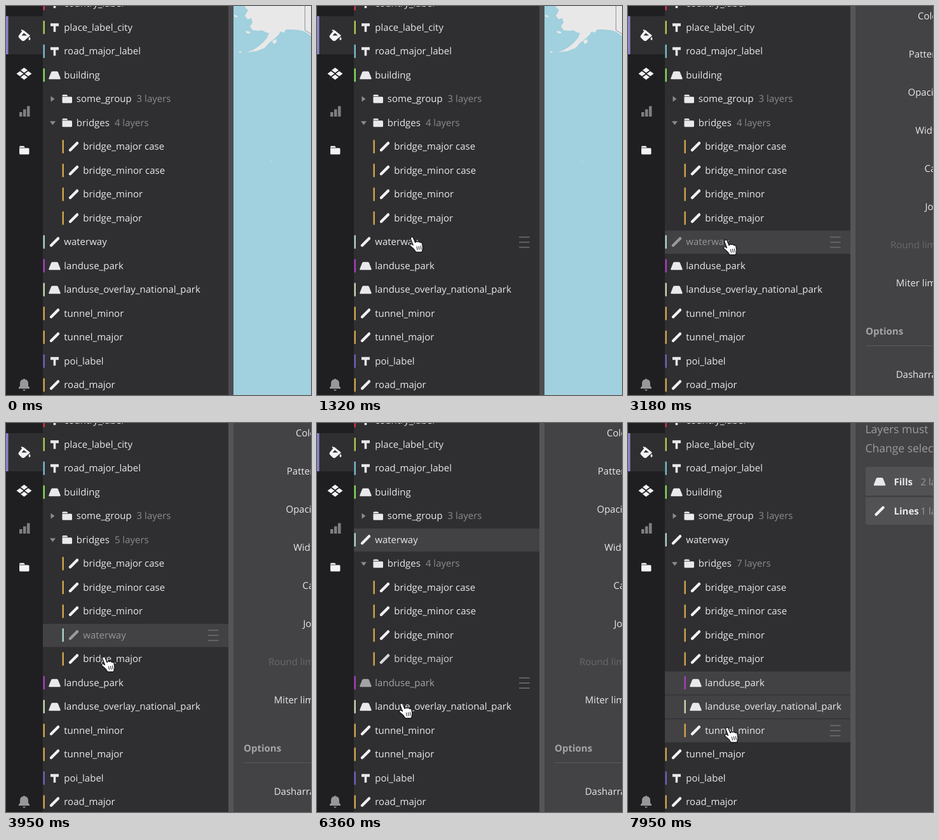
These frames come from a looping animation (480 by 612 pixels, 8000 ms). An HTML page:

```html
<!DOCTYPE html>
<html lang="en">
<head>
<meta charset="utf-8">
<title>Layer list</title>
<style>
  html, body { margin: 0; width: 100%; height: 100%; overflow: hidden; background: #2f2e31; }
  svg { display: block; width: 480px; height: 612px; font: 15px "Open Sans", sans-serif; fill: #e9e8ea; color: #f1f0f2; text-rendering: geometricPrecision; }
  .soft { fill: #8b8a8d; }
  .mid { fill: #9c9b9e; }
  .bold { font-weight: 700; }
</style>
</head>
<body>
<svg viewBox="0 0 480 612">
  <g id="map">
    <rect x="350" width="130" height="612" fill="#a1d0de"/>
    <path fill="#e9e8e9" d="M375 0L381 7L376 15L380 21L386 19L388 26L384 32L388 38L398 39L403 38L410 42L414 42L411 50L405 57L397 64L389 69L379 73L394 71L407 66L414 58L423 51L429 45L432 40L437 42L441 37L452 37L462 38L470 40L480 47V0Z"/>
    <path fill="#e9e8e9" d="M359 14l4 1 2 3-5-1ZM377 39l6 1 2 3-6 0ZM419 55l6-3 1 5-5 3ZM366 72l6-1-4 3ZM416 244h2v1h-2Z"/>
    <path d="M470.500 0V38L480 44" fill="none" stroke="#8d9297"/>
  </g>
  <g id="style">
    <rect x="350" width="130" height="612" fill="#434245"/>
    <g id="props" text-anchor="end"></g>
    <text class="bold" x="374" y="517" fill="#a5a4a7">Options</text>
    <path d="M374 534.500H480" stroke="#59585b"/>
  </g>
  <g id="multi">
    <rect x="350" width="130" height="612" fill="#434245"/>
    <g class="mid" font-size="17.500"><text x="373.500" y="16">Layers must</text><text x="373.500" y="46">Change selected</text></g>
    <path d="M480 69H377q-3 0-3 3V114H480ZM480 117H374V157q0 3 3 3H480Z" fill="#525154"/>
    <g id="cards"></g>
  </g>
  <rect id="divider" x="350" width="8" height="612"/>
  <rect x="58" width="292" height="612" fill="#2f2e31"/>
  <g id="list"></g>
  <rect width="58" height="612" fill="#1f1e21"/>
  <rect y="16" width="58" height="60" fill="#2f2e31"/>
  <rect y="16" width="3.500" height="60" fill="#8b86c9"/>
  <g id="rail" fill="#f3f2f4">
    <path d="M27 37.500l11 9-9 8q-2 1-4 0l-5-5q-1-2 0-3Z"/>
    <path d="M24 37.500l10 8" fill="none" stroke="#f3f2f4" stroke-width="1.800"/>
    <path d="M24.500 46.500L28 42.500L33 46.500Z" fill="#2f2e31"/>
    <path d="M37 48.500q3 4 0 5.500q-3-1.500 0-5.500Z"/>
    <path d="M28.500 97l5.500 4-5.500 4-5.500-4ZM22 102.500l5.500 4-5.500 4-5.500-4ZM35 102.500l5.500 4-5.500 4-5.500-4ZM28.500 108l5.500 4-5.500 4-5.500-4Z"/>
    <path fill="#7f7e81" d="M21 167h4.500v7h-4.500ZM27 162.500h4.500v11.500h-4.500ZM33 157.500h4.500v16.500h-4.500Z"/>
    <path fill="#98979a" d="M20 602V600L22 598V594Q22 588 27 587.500Q28.500 585 30 587.500Q35 588 35 594V598L37 600V602ZM26 603.500h5q-2.500 4-5 0Z"/>
  </g>
  <g id="hand" stroke="#161518" stroke-linejoin="round" stroke-linecap="round">
    <path fill="#fff" stroke-width="1.300" d="M-4.500 1Q-3.500-2-.5-1L3 7.500Q5 5 7 6.500Q9 5 10.500 7.500Q13.500 6.500 14 9.500L15 16L13.500 22.500H4L1 18L-5.500 12.500Q-5.500 9-2.500 10L-.5 11.500Z"/>
    <path fill="none" d="M5.500 14l1 5M8.500 13.500l1 5M11.500 13l.8 5"/>
  </g>
</svg>
<script>
const $ = id => document.getElementById(id);
const LOOP = 8000, ROW = 37.5, GOLD = '#cda348';
const SHOW_STYLE = 1900, PICK_PARK = 6920, PICK_RANGE = 7340, GROUP_RANGE = 7800;

const layer = (name, icon, color, nested = false) => ({ name, icon, color, nested });
const folder = (name, open) => ({ name, folder: true, open });
const WATERWAY = layer('waterway', 'line', '#adcfcb');
const BASE = [
  layer('country_label', 'text', '#d3324a'),
  layer('place_label_city', 'text', '#abc950'),
  layer('road_major_label', 'text', '#76bcc8'),
  layer('building', 'fill', '#81dc58'),
  folder('some_group', false),
  folder('bridges', true),
  layer('bridge_major case', 'line', GOLD, true),
  layer('bridge_minor case', 'line', GOLD, true),
  layer('bridge_minor', 'line', GOLD, true),
  layer('bridge_major', 'line', GOLD, true),
  layer('landuse_park', 'fill', '#a43fbd'),
  layer('landuse_overlay_national_park', 'fill', '#c3d4aa'),
  layer('tunnel_minor', 'line', GOLD),
  layer('tunnel_major', 'line', GOLD),
  layer('poi_label', 'text', '#6d62b8'),
  layer('road_major', 'line', GOLD)
];
const RANGE = BASE.slice(10, 13);

// time, slot of the waterway layer, inside the group
const MOVES = [[0, 10, 0], [2150, 11, 0], [2850, 10, 0], [3350, 10, 1], [3930, 9, 1],
  [4250, 8, 1], [4500, 7, 1], [4750, 6, 1], [5500, 5, 0]];
// time, x, y of the pointer tip
const PATH = [[930, 490, 424], [1300, 151, 364], [1480, 156, 369], [6120, 156, 369], [6360, 135, 442],
  [6480, 135, 444], [6780, 141, 410], [6980, 141, 410], [7280, 158, 480]];

const latest = (list, t) => list.filter(item => item[0] <= t).pop();
const rowY = i => -3.8 + ROW * i;

function pointer(t) {
  const i = PATH.findIndex(p => p[0] > t);
  if (i === 0) return [-99, -99];
  if (i < 0) return PATH[PATH.length - 1].slice(1);
  const a = PATH[i - 1], b = PATH[i], k = (t - a[0]) / (b[0] - a[0]);
  return [a[1] + (b[1] - a[1]) * k, a[2] + (b[2] - a[2]) * k];
}

function rowsAt(t) {
  const rows = [...BASE];
  rows.splice(latest(MOVES, t)[1], 0, WATERWAY);
  return rows;
}

function hovered(t) {
  const [x, y] = pointer(t);
  return x > 58 && x < 350 ? rowsAt(t)[Math.round((y - rowY(0)) / ROW)] : null;
}

function icon(kind, x, y) {
  if (kind === 'text') return `<path d="M${x - 6.5} ${y - 6.5}h13v4.500h-4.700v9h-3.600v-9h-4.700Z"/>`;
  if (kind === 'fill') return `<path d="M${x - 3.5} ${y - 6}h7q1.500 0 2 1.500l3.500 9q.8 2-1.200 2h-15.600q-2 0-1.200-2l3.500-9q.5-1.500 2-1.500Z"/>`;
  if (kind === 'line') return `<path d="M${x - 5.5} ${y + 5.5}l11-11" stroke="currentColor" stroke-width="4.400" stroke-linecap="round"/>`;
  return `<path d="M${x - 7.5} ${y - 4.200}v-1q0-1.500 1.500-1.500h5q1 0 1.500 1l.8 1.500ZM${x - 7.5} ${y - 3.500}h14q1.500 0 1.500 1.500v7q0 1.500-1.500 1.500h-12.500q-1.500 0-1.500-1.500Z"/>`;
}

function drawRow(row, y, s) {
  const text = (x, extra = '') => `<text x="${x}" y="${y + 5}">${row.name}${extra}</text>`;
  if (row.folder) {
    const count = row.open ? s.count : 3;
    const arrow = row.open ? `M69 ${y - 2.5}h9l-4.500 6Z` : `M70.500 ${y - 4.5}l6 4.500-6 4.500Z`;
    return `<path class="soft" d="${arrow}"/>${icon('folder', 96, y)}` +
      text(110.8, `<tspan class="soft" dx="8">${count} layers</tspan>`);
  }
  const nested = row === WATERWAY ? s.waterNested : row.nested || (s.grouped && RANGE.includes(row));
  const shift = nested ? 30 : 0;
  const back = s.selected.includes(row)
    ? `<rect x="58" y="${y - 17.8}" width="292" height="36.500" fill="#424144"/>` : '';
  const grip = row === s.hover
    ? `<path d="M318 ${y - 7.5}h16.500m-16.500 8h16.500m-16.500 8h16.500" stroke="#69686b" stroke-width="1.800"/>` : '';
  return `${back}<rect x="${58.5 + shift}" y="${y - 10.5}" width="2.500" height="21" fill="${row.color}"/>` +
    `<g opacity="${1 - 0.5 * s.dim(row)}">${icon(row.icon, 76.5 + shift, y)}${text(91.3 + shift)}</g>${grip}`;
}

function render(t) {
  const [, , inGroup] = latest(MOVES, t);
  const grouped = t >= GROUP_RANGE;
  const recent = [60, 110, 160, 210].map(lag => hovered(Math.max(0, t - lag)));
  const canDim = t > 2000 && t < PICK_PARK;
  const state = {
    grouped,
    waterNested: inGroup,
    count: grouped ? 7 : 4 + inGroup,
    selected: t < SHOW_STYLE ? [] : t < PICK_PARK ? [WATERWAY] : t < PICK_RANGE ? [RANGE[0]] : RANGE,
    hover: recent[0],
    dim: row => canDim ? recent.filter(r => r === row).length / recent.length : 0
  };
  $('list').innerHTML = rowsAt(t).map((row, i) => drawRow(row, rowY(i), state)).join('');

  const show = (id, on) => $(id).setAttribute('display', on ? 'inline' : 'none');
  show('map', t < SHOW_STYLE);
  show('style', t >= SHOW_STYLE && t < PICK_RANGE);
  show('multi', t >= PICK_RANGE);
  $('divider').setAttribute('fill', t < SHOW_STYLE ? '#4e4d50' : '#555457');
  $('hand').setAttribute('transform', `translate(${pointer(t)})`);
}

$('rail').innerHTML += icon('folder', 28.5, 227);
$('props').innerHTML = ['Color', 'Pattern', 'Opacity', 'Width', 'Cap', 'Join', 'Round limit', 'Miter limit', 'Dasharray']
  .map((name, i) => `<text x="493.500" y="${i === 8 ? 585 : 20.5 + i * 60}"${i === 6 ? ' fill="#69686b"' : ''}>${name}</text>`).join('');
$('cards').innerHTML = [['fill', 'Fills', 2], ['line', 'Lines', 1]].map(([kind, name, n], i) => {
  const y = 92 + i * 46.5;
  return icon(kind, 396, y) + `<text class="bold" x="418.500" y="${y + 5.5}">${name}</text><text class="mid" x="460.500" y="${y + 5.5}">${n} layers</text>`;
}).join('');

const start = performance.now();
(function tick() {
  render(Math.max(0, performance.now() - start) % LOOP);
  requestAnimationFrame(tick);
})();
</script>
</body>
</html>
```
